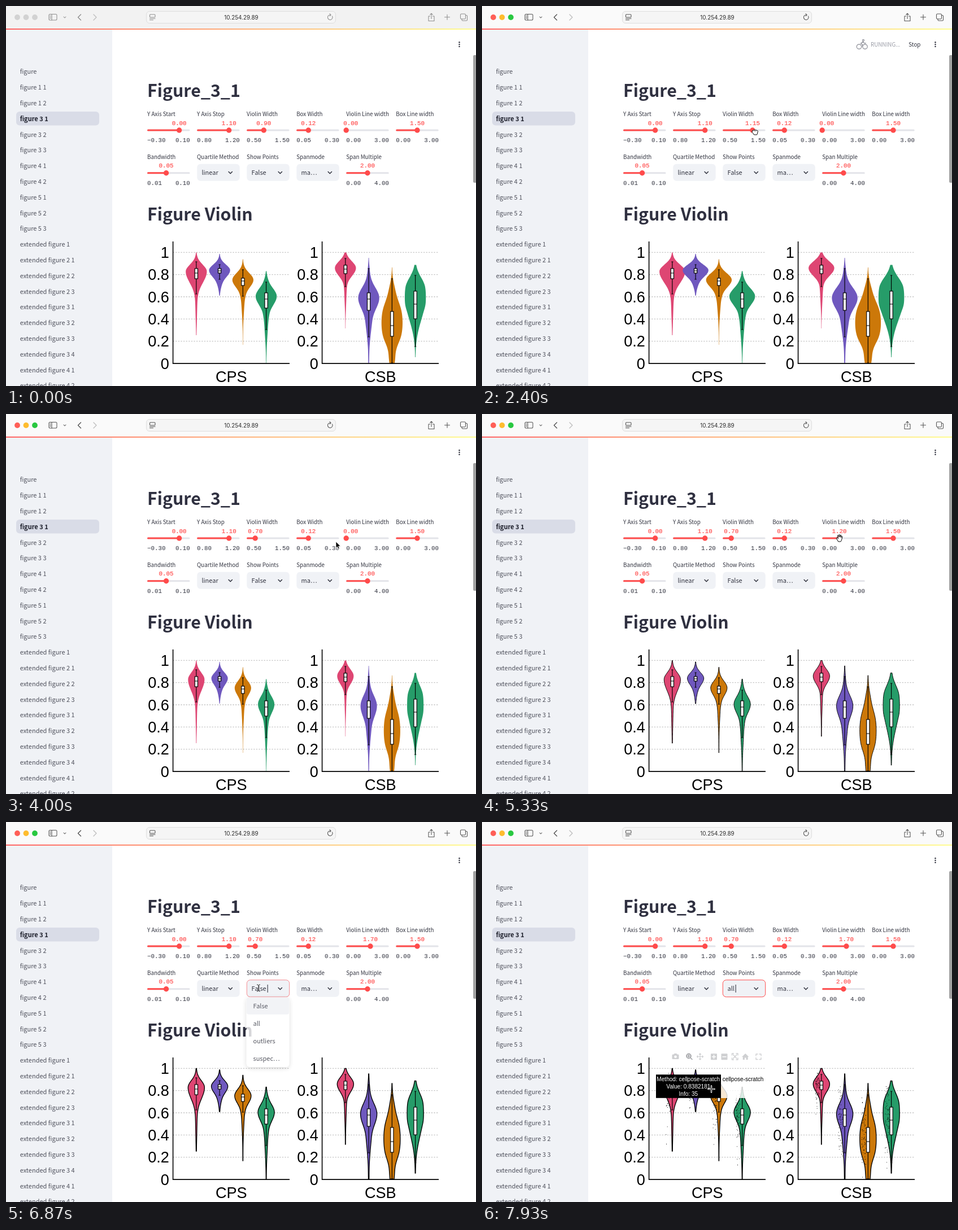
These frames come from a looping animation (832 by 673 pixels, 8000 ms). An HTML page:

```html
<!DOCTYPE html>
<html lang="en">
<head>
<meta charset="utf-8">
<title>Figure_3_1</title>
<style>
html, body { margin: 0; width: 100%; height: 100%; overflow: hidden; background: #fff; }
svg { display: block; width: 100vw; height: 100vh; }
text { white-space: pre; }
.ui { font-family: "Noto Sans CJK JP", "Noto Sans CJK SC", "Noto Sans CJK", "Noto Sans", sans-serif; fill: #31333f; }
.nav { font-size: 11px; fill: #50525d; }
.on { font-weight: 700; fill: #1c1e2a; }
.h1 { font-size: 30.3px; font-weight: 700; fill: #2f3040; }
.lab { font-size: 9.8px; }
.sel { font-size: 11px; }
.mono { font: 10.8px "Liberation Mono", monospace; fill: #31333f; }
.red { fill: #ff4b4b; stroke: #ff4b4b; stroke-width: .2; }
.tick { font: 27.1px "Liberation Sans", Arial, sans-serif; }
.tip { font: 10.07px "Liberation Sans", Arial, sans-serif; }
.mid { text-anchor: middle; }
.end { text-anchor: end; }
.line { fill: none; stroke-linecap: round; stroke-linejoin: round; }
</style>
</head>
<body>
<svg id="stage" viewBox="0 0 832 673" preserveAspectRatio="none"></svg>
<script>
const LOOP = 8000;
const stage = document.getElementById('stage');
const $ = id => document.getElementById(id);
const text = (x, y, s, cls, more = '') => `<text x="${x}" y="${y}" class="${cls}" ${more}>${s}</text>`;
const rect = (x, y, w, h, fill, r = 0, more = '') =>
  `<rect x="${x}" y="${y}" width="${w}" height="${h}" rx="${r}" fill="${fill}" ${more}/>`;
const line = (d, color, w = 1, more = '') =>
  `<path class="line" d="${d}" stroke="${color}" stroke-width="${w}" ${more}/>`;
const clamp = (v, lo, hi) => Math.min(hi, Math.max(lo, v));
const within = (t, spans) => spans.some(([a, b]) => t >= a && t < b);
const show = (id, on) => $(id).setAttribute('visibility', on ? 'visible' : 'hidden');
const col = i => 250 + 88.05 * i;

// Eased value between [time, value...] keys
function track(keys, t) {
  if (t <= keys[0][0]) return keys[0].slice(1);
  for (let i = 1; i < keys.length; i++) {
    const [a, b] = [keys[i - 1], keys[i]];
    if (t < b[0]) {
      const u = (t - a[0]) / (b[0] - a[0]), e = u * u * (3 - 2 * u);
      return a.slice(1).map((v, k) => v + (b[k + 1] - v) * e);
    }
  }
  return keys[keys.length - 1].slice(1);
}
// Last value whose time has come
const step = (keys, t) => keys.reduce((v, k) => (t >= k[0] ? k[1] : v), keys[0][1]);

/* ---------- browser bar ---------- */
function browser() {
  const icons =
    '<rect x="76" y="14.5" width="14" height="10.5" rx="2"/><path d="M81 14.5v10.5M78 17h1.2M78 19.3h1.2M78 21.6h1.2"/>' +
    '<path d="M102 19l2 2 2-2"/><path d="M132.5 15l-5 5 5 5" stroke-width="1.4"/>' +
    '<rect x="254.5" y="15" width="9.5" height="5" rx="1"/><path d="M254.5 22.3h9.5M254.5 24.8h6"/>' +
    '<path d="M577.5 18a4.3 4.3 0 1 1-3.5-2.2M573 13.5l2.2 2.3-2.2 2"/>' +
    '<path d="M750.5 18h-2.5v8.5h10v-8.5h-2.5M753 22.5v-9M750.5 15.5l2.5-2.5 2.5 2.5"/>' +
    '<path d="M776.5 19.7h9M781 15.2v9"/>' +
    '<rect x="804.5" y="14" width="9" height="9" rx="1.8"/><path d="M807 23v1.5q0 1.5 1.5 1.5h6.5q1.5 0 1.5-1.5v-6.5q0-1.5-1.5-1.5h-1.5"/>';
  return rect(0, 0, 832, 41, '#f2f2f2', 0, 'id="bar"') +
    [20, 35.5, 51].map((x, i) => `<circle id="light${i}" cx="${x}" cy="20" r="4.9"/>`).join('') +
    rect(248.5, 9.5, 335, 21, '#f5f5f5', 5.5, 'stroke="#dedede"') +
    `<g id="icons" class="line" stroke="#8e8e8e" stroke-width="1.05">${icons}</g>` +
    line('M155 15l5 5-5 5', '#bdbdbd', 1.3) +
    text(416.5, 23.8, '10.254.29.89', 'mid', 'font-family="Inter, sans-serif" font-size="9.9" fill="#2c2c2c"') +
    rect(0, 40, 832, 1.7, 'url(#deco)');
}

/* ---------- side bar ---------- */
function sidebar() {
  const names = ['', '1 1', '1 2', '3 1', '3 2', '3 3', '4 1', '4 2', '5 1', '5 2', '5 3'].map(s => 'figure ' + s)
    .concat(['1', '2 1', '2 2', '2 3', '3 1', '3 2', '3 3', '3 4', '4 1', '4 2'].map(s => 'extended figure ' + s));
  return rect(0, 41.7, 188, 632, '#f0f2f6') + rect(18, 187, 147, 24.5, '#d9dce7', 6) +
    names.map((s, i) => text(24.7, 120.3 + 27.8 * i, s.trim(), 'ui nav' + (i === 3 ? ' on' : ''))).join('');
}

/* ---------- controls ---------- */
const sliders = [
  ['Y Axis Start', 0, 0, -0.3, 0.1, 0], ['Y Axis Stop', 1, 0, 0.8, 1.2, 1.1],
  ['Violin Width', 2, 0, 0.5, 1.5, 0.9], ['Box Width', 3, 0, 0.05, 0.3, 0.12],
  ['Violin Line width', 4, 0, 0, 3, 0], ['Box Line width', 5, 0, 0, 3, 1.5],
  ['Bandwidth', 0, 1, 0.01, 0.1, 0.05], ['Span Multiple', 4, 1, 0, 4, 2]
];
const num = v => v.toFixed(2).replace('-', '\u2212');

function slider([name, c, row, lo, hi], i) {
  const x = col(c), y = 75.7 * row;
  return text(x, 195 + y, name, 'ui lab') + text(0, 210.6 + y, '', 'mono red mid', `id="val${i}"`) +
    rect(x, 218.5 + y, 75.5, 3, '#e3e4e9', 1.5) + rect(x, 218.5 + y, 0, 3, '#ff4b4b', 1.5, `id="fill${i}"`) +
    `<circle id="knob${i}" cy="${220 + y}" r="4.7" fill="#ff4b4b"/>` +
    text(x, 241 + y, num(lo), 'mono') + text(x + 75.8, 241 + y, num(hi), 'mono end');
}
function setSlider(i, v, shown) {
  const [, c, , lo, hi] = sliders[i], x = col(c), w = 75.5 * (v - lo) / (hi - lo);
  $('fill' + i).setAttribute('width', w);
  $('knob' + i).setAttribute('cx', x + w);
  $('val' + i).setAttribute('x', x + clamp(w, 8, 67.5));
  $('val' + i).textContent = num(shown);
}
function select(c, name, value, id) {
  const x = col(c);
  return text(x, 271, name, 'ui lab') + rect(x + .2, 279.8, 75.4, 30, '#f0f2f6', 6, `id="${id}Box"`) +
    text(x + 8.4, 299.4, value, 'ui sel', `id="${id}"`) +
    line(`M${x + 56} 293.5l3.2 3.2 3.2-3.2`, '#31333f', 1.5);
}
function menu() {
  return '<g id="menu"><g filter="url(#shade)">' + rect(425.8, 310.5, 75.5, 123.5, '#fff', 6) + '</g>' +
    rect(425.8, 310.8, 75.5, 30, '#f0f1f5', 4, 'id="hover"') +
    ['False', 'all', 'outliers', 'suspec…'].map((s, i) => text(437.5, 330 + 31 * i, s, 'ui sel')).join('') + '</g>';
}
function status() {
  const bike = '<circle cx="667.5" cy="72" r="4.2"/><circle cx="678" cy="72" r="4.2"/>' +
    '<circle cx="675" cy="60.8" r="1.5"/><path d="M673.5 72v-3.5l-3-2.3 3.8-3 2.5 2.7h2.7"/>';
  return `<g id="running"><g class="line" stroke="#8b8d96" stroke-width="1.2">${bike}</g>` +
    text(688, 72, 'RUNNING...', 'ui lab', 'style="fill:#999ba5"') + text(755.3, 72, 'Stop', 'ui lab') + '</g>' +
    [64.2, 68, 71.8].map(y => `<circle cx="802.5" cy="${y}" r="1.25" fill="#31333f"/>`).join('');
}

/* ---------- violins ---------- */
const colors = ['#de4673', '#6f58be', '#cc7809', '#269c69'];
// ends: top, bottom; box: whisker, quartile, median, quartile, whisker
// bumps: centre, spread above, spread below, weight
const violins = [
  { ends: [436.5, 583], box: [453, 465, 473, 483, 510], bumps: [[470, 12, 20.5, 1], [530, 18, 28, .07]] },
  { ends: [439, 513], box: [458, 465, 469, 473, 484], bumps: [[468, 10, 12.5, 1], [495, 8, 10, .1]] },
  { ends: [448.5, 600], box: [467, 482, 487, 495, 514], bumps: [[485, 12, 14, 1], [518, 10, 25, .14]] },
  { ends: [469.5, 632.5], box: [489, 508, 519, 535, 573], bumps: [[514, 14.5, 17, 1], [555, 12, 30, .17], [485, 9, 9, .06]] },
  { ends: [436.5, 571], box: [447, 459, 466, 474, 497], bumps: [[464, 12, 14.5, 1], [505, 10, 24, .09]] },
  { ends: [446, 632.5], box: [465, 508, 519, 539, 586], bumps: [[517, 19, 21.5, 1], [567, 15, 19, .2], [470, 12, 12, .06], [600, 15, 40, .04]] },
  { ends: [463, 632.5], box: [483, 541, 566, 585, 632], bumps: [[540, 22, 24, 1], [582, 24, 20, 1], [500, 14, 14, .18], [628, 14, 20, .3]] },
  { ends: [458.5, 622], box: [477, 505, 528, 554, 603], bumps: [[498, 18, 22, 1], [535, 18, 30, .8]] }
];
const left = p => (p ? 559.6 : 295.6);
violins.forEach((v, i) => {
  v.x = left(i > 3) + 41.25 * (i % 4 + 1);
  v.raw = y => v.bumps.reduce((s, [m, up, down, w]) => s + w * Math.exp(-(((y - m) / (y < m ? up : down)) ** 2) / 2), 0);
  v.max = 0;
  for (let y = v.ends[0]; y < v.ends[1]; y++) v.max = Math.max(v.max, v.raw(y));
  v.at = y => v.raw(y) / v.max;
});
function outline(v, width) {
  const [a, b] = v.ends, n = 64, half = 20.5 * width, r = [], l = [];
  for (let i = 0; i <= n; i++) {
    const y = a + (b - a) * i / n, w = half * v.at(y) + .2;
    r.push(`${(v.x + w).toFixed(2)} ${y.toFixed(2)}`);
    l.unshift(`${(v.x - w).toFixed(2)} ${y.toFixed(2)}`);
  }
  return `M${r.join('L')}L${l.join('L')}Z`;
}
let seed = 7;
const rand = () => (seed = (seed * 16807) % 2147483647) / 2147483647;
function dots(v) {
  let d = '';
  for (let n = 0; n < 62;) {
    const y = v.ends[0] + 8 + rand() * (v.ends[1] - v.ends[0] - 10);
    if (rand() > v.at(y)) continue;
    d += `M${(v.x - 3.5 - rand() * 7.5).toFixed(1)} ${y.toFixed(1)}h.01`;
    n++;
  }
  return line(d, '#000', 1.1);
}
function boxPlot({ x, box: [a, q, m, p, b] }) {
  return line(`M${x} ${a}V${q}M${x} ${p}V${b}M${x - 1.2} ${a}h2.4M${x - 1.2} ${b}h2.4`, '#000', 1.15) +
    rect(x - 2.6, q, 5.2, p - q, '#fff', 0, 'stroke="#000" stroke-width="1.15"') + line(`M${x - 2.6} ${m}h5.2`, '#000', 1.15);
}
function plots() {
  let s = '';
  for (const p of [0, 1]) {
    const x = left(p);
    for (let k = 0; k <= 5; k++) {
      const y = 632.9 - 39.3 * k;
      if (k) s += `<path d="M${x} ${y}h206.2" stroke="#c4c4c4" stroke-width="1.3" stroke-dasharray="2.3 2.3"/>`;
      s += text(x - 6.8, y + 9.6, k % 5 ? (k / 5).toFixed(1) : k / 5, 'tick end');
    }
    s += text(x + 103.2, 666, p ? 'CSB' : 'CPS', 'tick mid');
  }
  violins.forEach((v, i) => {
    s += `<path id="violin${i}" fill="${colors[i % 4]}" stroke="#000" stroke-linejoin="round"/>` + boxPlot(v);
  });
  s += '<g id="dots">' + violins.map(dots).join('') + '</g>';
  for (const p of [0, 1]) s += `<path d="M${left(p)} 417V633.1H${left(p) + 206.4}" fill="none" stroke="#000" stroke-width="1.6"/>`;
  return s;
}
function modebar() {
  const g = '#cfd0d2';
  return '<g id="modebar">' +
    rect(336.5, 411.5, 12, 8.5, g, 1.5) + rect(340, 410, 5, 3, g, 1) + '<circle cx="342.5" cy="415.8" r="2.3" fill="#fff"/>' +
    '<circle cx="366" cy="414.5" r="3.9" fill="none" stroke="#9b9ca0" stroke-width="1.7"/>' +
    line('M369 417.5l3 3M364 414.5h4M366 412.5v4', '#9b9ca0', 1.4) +
    line('M381 415.5h10M386 410.5v10M382 414l-1.5 1.5 1.5 1.5M390 414l1.5 1.5-1.5 1.5M384.5 411.5l1.5-1.5 1.5 1.5M384.5 419.5l1.5 1.5 1.5-1.5', g, 1.2) +
    rect(405, 410.2, 11, 11, g, 1) + line('M407.5 415.7h6M410.5 412.7v6', '#fff', 1.6) +
    rect(423.5, 410.2, 11, 11, g, 1) + line('M426 415.7h6', '#fff', 1.6) +
    line('M442.5 413v-3h3M450 410h3v3M453 418v3h-3M445.5 421h-3v-3M444.5 412l6.5 7M451 412l-6.5 7', g, 1.4) +
    `<path d="M460 416l6.2-6 6.2 6h-1.7v5h-3.2v-3.5h-2.6v3.5h-3.2v-5z" fill="${g}"/>` +
    line('M485 414v-3h3M491 411h3v3M494 417.5v3h-3M488 420.5h-3v-3', g, 1.4) + '</g>';
}
function tooltip() {
  return '<g id="tip">' + rect(423, 447.5, 79, 41.5, '#fff', 0, 'fill-opacity=".82"') + rect(308, 447.3, 115, 41.5, '#000') +
    ['Method: cellpose-scratch', 'Value: 0.8382181', 'Info: 35'].map((s, i) => text(365.3, 458.6 + 13.1 * i, s, 'tip mid', 'fill="#fff"')).join('') +
    text(425.7, 458.6, 'cellpose-scratch', 'tip') + '</g>';
}

/* ---------- pointer ---------- */
const pointers = {
  arrow: '<path d="M0 0v11.5l2.6-2.5 1.7 4 2-.9-1.7-3.9h3.6z" fill="#000" stroke="#fff" stroke-width=".8"/>',
  open: '<path d="M-5-1c-1-1 .5-2 1.5-.5l1 1.2-1-5c-.3-1.5 1.3-1.6 1.6-.3l.6 2.5.1-3.5c0-1.3 1.7-1.3 1.7 0l.2 3.4.8-2.8c.4-1.2 1.8-.8 1.6.4l-.5 3.3.9-1.5c.6-1 1.8-.5 1.4.6-1 2.8-1.2 7-3 8.2h-4.2c-1-1.8-2.6-4-3.2-6z" fill="#fff" stroke="#000"/>',
  closed: '<path d="M-4.5-1.5c0-1 1-1.3 1.8-.6 0-1.8 1.7-2 2.3-1 .6-.9 1.8-.8 2.2.1.7-.6 1.9-.3 2 .7 1.2-.4 1.9.4 1.6 1.6l-.9 4-.8 1.7h-5l-2-2.8-1.6-1.6c-.5-.8.2-1.5 1-1.2z" fill="#fff" stroke="#000"/><path d="M-.4-3v2M1.8-2.8v2" stroke="#000" stroke-width=".8"/>',
  beam: line('M-2.5-6q2 0 2.5 1.5Q.5-6 2.5-6M0-4.5v9M-2.5 6q2 0 2.5-1.5Q.5 6 2.5 6', '#222', 1),
  cross: line('M-5.5 0h11M0-5.5v11', '#fff', 2.6) + line('M-5 0H5M0-5V5', '#000', .9)
};
const kinds = [[0, ''], [130, 'arrow'], [760, 'open'], [1000, 'closed'], [3760, 'arrow'], [4240, 'open'], [4600, 'closed'],
  [4960, 'open'], [5470, 'closed'], [5900, 'open'], [6140, 'arrow'], [6680, 'beam'], [7010, 'arrow'], [7840, 'cross']];
const path = [[130, 836, 330], [800, 458, 222], [1000, 458, 222], [1480, 474, 223], [2070, 474, 223], [2530, 485, 223],
  [2730, 485, 223], [3150, 443, 222], [3730, 443, 222], [4000, 584, 226], [4300, 604, 222], [4600, 604, 222],
  [4930, 633, 221], [5470, 633, 221], [5870, 646, 222], [6070, 646, 222], [6730, 447, 294], [6930, 447, 294],
  [7150, 444, 352], [7730, 444, 352], [7930, 406, 473]];

/* ---------- timing ---------- */
const widthDrag = [[1000, .9], [1480, 1.1], [2070, 1.1], [2530, 1.25], [2730, 1.25], [3150, .7]];
const lineDrag = [[4600, 0], [4930, 1.2], [5470, 1.2], [5820, 1.7]];
const drawnWidth = [[0, .9], [1800, 1.1], [2760, 1.25], [3400, .7]];
const drawnLine = [[0, 0], [5200, 1.2], [6130, 1.7]];
const running = [[2130, 2760], [3100, 3730], [5540, 5870], [7270, 7560]];
const snap = (v, s) => Math.round(v / s) * s;

stage.innerHTML =
  '<defs><linearGradient id="deco"><stop stop-color="#ff4b4b"/><stop offset="1" stop-color="#fffd80"/></linearGradient>' +
  '<filter id="shade" x="-30%" y="-20%" width="160%" height="140%"><feDropShadow dx="0" dy="2" stdDeviation="4" flood-opacity=".18"/></filter></defs>' +
  rect(0, 0, 832, 673, '#fff') + sidebar() + browser() + status() + rect(827, 87, 6, 226, '#a2a2a2', 2) +
  text(250, 161.3, 'Figure_3_1', 'ui h1') + sliders.map(slider).join('') +
  select(1, 'Quartile Method', 'linear', 'quart') + select(2, 'Show Points', 'False', 'points') + select(3, 'Spanmode', 'ma…', 'span') +
  rect(463, 288, 1.1, 14, '#31333f', 0, 'id="caret"') +
  text(250, 380.3, 'Figure Violin', 'ui h1') + plots() + modebar() + tooltip() + menu() + '<g id="pointer"></g>';
sliders.forEach((s, i) => setSlider(i, s[5], s[5]));

let drawn = '', kind = null;
function render(t) {
  const active = t >= 470;
  $('bar').setAttribute('fill', active ? '#fafafa' : '#f2f2f2');
  $('icons').setAttribute('stroke', active ? '#545454' : '#8e8e8e');
  ['#ff5f57', '#febc2e', '#28c840'].forEach((c, i) => $('light' + i).setAttribute('fill', active ? c : '#d2d2d2'));

  // The number trails the knob a little
  setSlider(2, snap(track(widthDrag, t)[0], .05), snap(track(widthDrag, t - 120)[0], .05));
  setSlider(4, snap(track(lineDrag, t)[0], .1), snap(track(lineDrag, t - 60)[0], .1));
  show('running', within(t, running));

  const w = step(drawnWidth, t), lw = step(drawnLine, t);
  if (drawn !== w + '/' + lw) {
    drawn = w + '/' + lw;
    violins.forEach((v, i) => {
      $('violin' + i).setAttribute('d', outline(v, w));
      $('violin' + i).setAttribute('stroke-width', lw * .78);
    });
  }

  const focus = t >= 6870, picked = t >= 7230;
  $('points').textContent = picked ? 'all' : 'False';
  $('pointsBox').setAttribute('stroke', focus ? (t < 6930 ? '#f58b90' : '#ff4b4b') : 'none');
  $('caret').setAttribute('x', picked ? 448.6 : 462.6);
  show('caret', focus);
  show('menu', focus && !picked);
  $('menu').setAttribute('opacity', clamp(.8 + (t - 6870) / 500, .8, 1));
  $('hover').setAttribute('y', t < 7080 ? 310.8 : 341.8);
  show('dots', t >= 7560);
  show('modebar', t >= 7830);
  show('tip', t >= 7870);

  const k = step(kinds, t), [x, y] = track(path, t);
  if (k !== kind) $('pointer').innerHTML = pointers[kind = k] || '';
  $('pointer').setAttribute('transform', `translate(${x.toFixed(2)} ${y.toFixed(2)})`);
}
const start = performance.now();
function frame() {
  render((performance.now() - start) % LOOP);
  requestAnimationFrame(frame);
}
frame();
</script>
</body>
</html>
```
